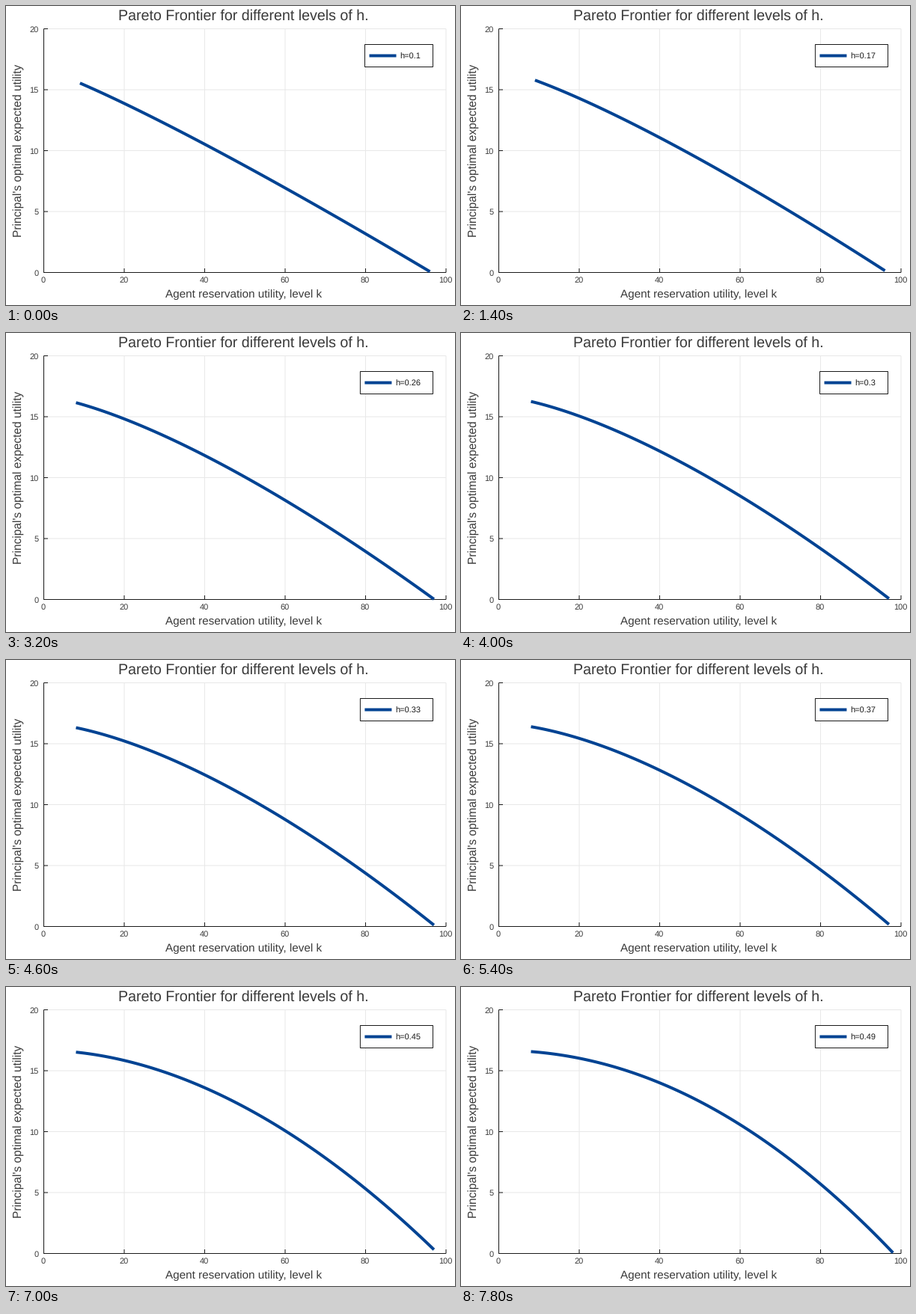
Recreate the animation shown at these times as a matplotlib script. Size 600 by 400 pixels, loop 8000 ms.

```python
import math

import numpy as np
import matplotlib.pyplot as plt
from matplotlib.animation import FuncAnimation
from matplotlib.patches import Rectangle

W, H, DPI = 600, 400, 100
PT = 72 / DPI
BLUE, INK, DARK, GRID = "#004393", "#1a1a1a", "#3a3a3a", "#e8e8e8"
FRAMES, STEP_MS = 40, 200

plt.rcParams.update({
    "font.family": "Liberation Sans",
    "text.hinting": "no_hinting",
    "path.snap": False,
})
fig = plt.figure(figsize=(W / DPI, H / DPI), dpi=DPI, facecolor="white")
ax = fig.add_axes([0, 0, 1, 1])
ax.set_xlim(0, W)
ax.set_ylim(H, 0)
ax.axis("off")


def px(k):
    return 50.5 + 5.375 * k


def py(u):
    return 356.5 - 16.3 * u


def line(xs, ys, color=INK, width=1, z=2):
    return ax.plot(xs, ys, color=color, lw=width * PT, zorder=z,
                   solid_capstyle="butt", solid_joinstyle="round")[0]


def text(x, y, s, size, color=DARK, ha="center", **kw):
    return ax.text(x, y, s, fontsize=size * PT, color=color, ha=ha,
                   va="baseline", zorder=5, **kw)


def frontier(h):
    """Principal's utility falls as a power of k and reaches zero at k = root."""
    root = 95.9 + 4.65 * h
    power = (1.017 + 0.05 * h) / (1 - h)
    first = 9 if root < 97 else 8
    k = np.arange(first, math.floor(root) + 1)
    return k, 16.67 * (1 - (k / root) ** power)


# Grid, ticks and axes
left, right, top, bottom = px(0), px(100), py(20), py(0)
for k in range(0, 101, 20):
    x = px(k)
    if k:
        line([x, x], [top, bottom], GRID, z=1)
        line([x, x], [bottom, bottom - 5.5])
    text(x - 0.5, 370, str(k), 11)
for u in range(0, 21, 5):
    y = py(u)
    if u:
        line([left, right], [y, y], GRID, z=1)
        line([left, left + 5.5], [y, y])
    text(43.5, y + 4, str(u), 11, ha="right")
line([left, left], [top, bottom + 0.5])
line([left - 0.5, right], [bottom, bottom])

text(317, 19, "Pareto Frontier for different levels of h.", 19.6)
text(318, 390, "Agent reservation utility, level k", 15.3)
text(21, 193.5, "Principal's optimal expected utility", 15.5,
     rotation=90, rotation_mode="anchor")

curve = line([], [], BLUE, 4, z=3)

# Legend, anchored at its right edge
box = ax.add_patch(Rectangle((0, 51.5), 1, 30, fc="white", ec=INK,
                             lw=PT, zorder=4))
key = line([], [], BLUE, 4, z=5)
label = text(0, 70.5, "", 11, INK, ha="left")


def draw_legend(h):
    name = f"h={h:g}"
    x = 570.5 - 60.5 - 6.1 * len(name)
    box.set_x(x)
    box.set_width(570.5 - x)
    key.set_data([x + 6, x + 42], [66.5, 66.5])
    label.set_text(name)
    label.set_x(x + 47)


def update(i):
    h = (10 + i) / 100
    k, u = frontier(h)
    curve.set_data(px(k), py(u))
    draw_legend(h)
    return [curve, box, key, label]


anim = FuncAnimation(fig, update, frames=FRAMES, interval=STEP_MS,
                     init_func=lambda: update(0), repeat=True,
                     repeat_delay=0, blit=False)
plt.show()
```
